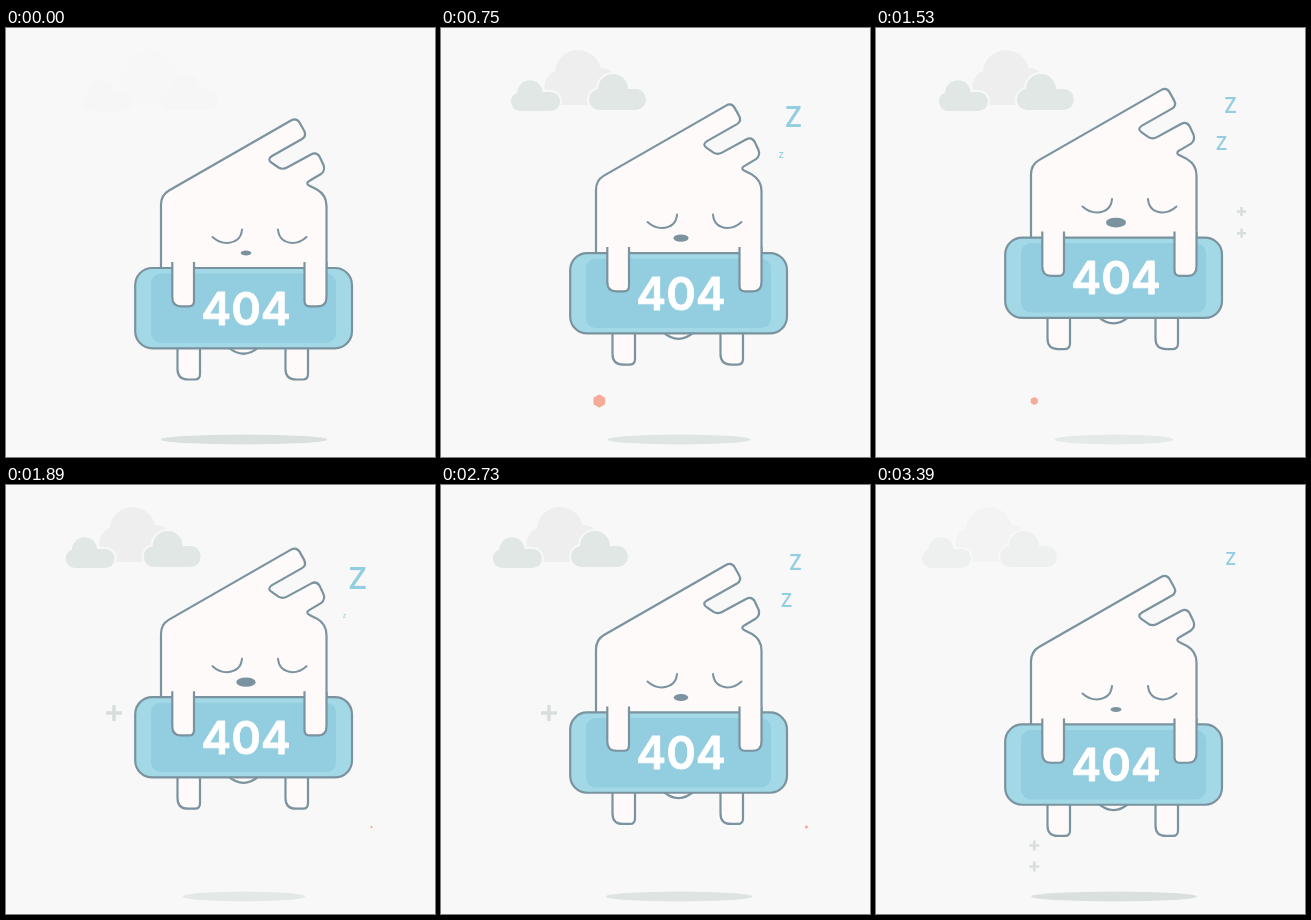
Recreate the animation shown at these times as an HTML page. Size 429 px wide and 429 px high, loop 3420 ms.

```html
<!DOCTYPE html>
<html lang="en">
<head>
<meta charset="utf-8">
<title>404</title>
<style>
  html, body { margin: 0; width: 100%; height: 100%; overflow: hidden; background: #f8f8f8; }
  svg { display: block; width: 100vw; height: 100vh; }
  .line { fill: #fefafa; stroke: #7a939f; stroke-width: 2.2; stroke-linecap: butt; stroke-linejoin: round; }
  .eye { fill: none; stroke-width: 2; stroke-linecap: round; }
  .back { fill: #eeeeee; }
  .gap { fill: #f8f8f8; stroke: #f8f8f8; stroke-width: 4; }
  .front { fill: #e0e7e5; }
  .plus { fill: none; stroke: #d7dedc; }
  .dot { fill: #f5ab98; stroke: #f5ab98; stroke-width: 3; stroke-linejoin: round; }
  .zed { font: 600 35px "Open Sans", sans-serif; fill: #92cde0; text-anchor: middle; }
  .code { font: 600 45px Inter, sans-serif; fill: #fff; stroke: #fff; stroke-width: .8; stroke-linejoin: round; text-anchor: middle; }
</style>
</head>
<body>
<svg viewBox="0 0 429 429">
  <defs>
    <g id="small">
      <rect x="67" y="64" width="49" height="19" rx="9.5"/>
      <circle cx="86" cy="65" r="12.7"/>
    </g>
    <g id="large">
      <rect x="145" y="61" width="57" height="21" rx="10.5"/>
      <circle cx="169" cy="61" r="15"/>
    </g>
  </defs>

  <g id="clouds">
    <g class="back">
      <circle cx="134" cy="45" r="23"/>
      <circle cx="118" cy="59" r="17.5"/>
      <circle cx="157" cy="57" r="17"/>
      <rect x="116" y="50" width="44" height="27"/>
    </g>
    <use href="#small" class="gap"/><use href="#small" class="front"/>
    <use href="#large" class="gap"/><use href="#large" class="front"/>
  </g>

  <ellipse id="shadow" cx="238" cy="411.5" ry="5"/>
  <g id="sparks"></g>
  <g id="zeds"></g>

  <g id="hero">
    <path class="line" d="M171.5 315V341Q171.5 351.5 182 351.5H189Q194 351.5 194 346V315"/>
    <path class="line" d="M279.5 315V341Q279.5 351.5 290 351.5H297Q302 351.5 302 346V315"/>
    <path class="line" d="M222 319Q237.500 332.500 253 319"/>
    <path class="line" d="M155 244V177Q155 167 163 162.500L285 92.500Q290.500 89.500 293.500 94.500L298 102.500Q301 108 296 111L266 128Q260.500 131.500 266 135L272.500 139.500Q276.500 142 281 139.500L305 126.500Q310.500 123.500 313.500 128.500L317.500 137Q319.500 142.500 315 146L304 152.500Q298.500 155.500 304 158L311 161.500Q320.500 167 320.500 178V244"/>
    <path class="line eye" d="M206.500 209Q213 215 221 215Q235 214 236 201.500"/>
    <path class="line eye" d="M300.500 209Q294 215 286.500 215Q273 214 272 201.500"/>
    <ellipse id="nose" cx="240" cy="225" fill="#7a939f"/>
    <rect class="line" x="129.200" y="240" width="216.800" height="80.300" rx="17" style="fill:#a3d9e7"/>
    <rect x="145" y="245.500" width="185" height="69.500" rx="10" fill="#92cde0"/>
    <text class="code" x="240" y="296.500">404</text>
    <path class="line" d="M166.300 234V269Q166.300 278.300 175 278.300H183Q188 278.300 188 273V234"/>
    <path class="line" d="M298.500 234V273Q298.500 278.300 304 278.300H312Q320.500 278.300 320.500 269V234"/>
  </g>
</svg>
<script>
const LOOP = 3420, STEP = 30;
const NS = 'http://www.w3.org/2000/svg';
const byId = id => document.getElementById(id);
const set = (el, attrs) => { for (const k in attrs) el.setAttribute(k, attrs[k]); };
const add = (parent, tag, attrs) => {
  const el = document.createElementNS(NS, tag);
  set(el, attrs);
  return parent.appendChild(el);
};
const clamp = v => Math.max(0, Math.min(1, v));

// Piecewise linear value through [time, value] points
function track(t, pts) {
  if (t <= pts[0][0]) return pts[0][1];
  for (let i = 1; i < pts.length; i++) {
    const [a, u] = pts[i - 1], [b, v] = pts[i];
    if (t <= b) return u + (v - u) * (t - a) / (b - a);
  }
  return pts[pts.length - 1][1];
}

// Snoring letters, one every 600 ms
const Z_GAP = 600, Z_LIFE = 1160;
const zeds = Array.from({ length: 5 }, (_, i) => {
  const el = add(byId('zeds'), 'text', { class: 'zed', y: 12.5 });
  el.textContent = 'Z';
  return { el, born: i * Z_GAP };
});
const Z_X = [[0, 336], [330, 345.5], [480, 349.5], [930, 354.5], [1200, 355.5]];
const Z_SIZE = [[0, 0], [600, 25], [930, 15], [1020, 12], [1080, 6.5], [Z_LIFE, 0]];

// Sparks: a dot swells, then breaks into two plus signs
const S_GAP = 830, S_TIMES = 4;
const hexagon = Array.from({ length: 6 }, (_, i) => {
  const a = (i * 60 - 90) * Math.PI / 180;
  return (5 * Math.cos(a)).toFixed(2) + ',' + (5 * Math.sin(a)).toFixed(2);
}).join(' ');
const sparks = [[108, 228, 40], [365.5, 342, 208], [365.5, 196, 395], [158.3, 373, 625]]
  .map(([x, y, start]) => {
    const g = add(byId('sparks'), 'g', { transform: `translate(${x} ${y})` });
    return {
      start,
      dot: add(g, 'polygon', { class: 'dot', points: hexagon }),
      low: add(g, 'path', { class: 'plus' }),
      high: add(g, 'path', { class: 'plus' })
    };
  });

function drawPlus(el, y, r) {
  set(el, {
    d: r > 0 ? `M${-r} ${y}H${r}M0 ${y - r}V${y + r}` : '',
    'stroke-width': 1.2 + r * 0.28
  });
}

function drawSpark(s, t) {
  const n = Math.floor((t - s.start) / S_GAP);
  const p = n >= 0 && n < S_TIMES ? t - s.start - n * S_GAP : -1;
  const r = p >= 0 && p < 172 ? Math.min(6.5, p * 0.053) : 0;
  set(s.dot, { transform: `scale(${r / 6.5})` });
  const on = p >= 172 && p < 340;
  drawPlus(s.low, track(p, [[215, 0], [275, 8.5], [340, 10]]),
    on ? track(p, [[172, 7], [190, 8], [215, 8], [275, 5], [310, 4.5], [340, 0]]) : 0);
  drawPlus(s.high, -12.5,
    on && p > 205 ? track(p, [[205, 5.5], [225, 6], [275, 5], [310, 4.5], [340, 0]]) : 0);
}

function drawZed(z, t) {
  const age = t - z.born;
  const size = age > 0 && age < Z_LIFE ? track(age, Z_SIZE) : 0;
  const y = 136.4 - age * 0.0633;
  set(z.el, {
    transform: `translate(${track(age, Z_X)} ${y}) scale(${size / 25})`,
    opacity: track(age, [[1020, 1], [1100, 0.5], [Z_LIFE, 0.2]])
  });
}

function render(t) {
  const lift = track(t, [[0, 0], [1635, 32.5], [LOOP, 0]]);
  set(byId('hero'), { transform: `translate(0 ${-lift})` });
  set(byId('nose'), { rx: 5.3 + lift * 0.155, ry: 2.5 + lift * 0.08 });
  set(byId('shadow'), {
    rx: 83.3 - lift * 0.79,
    fill: `rgb(${218 + lift * 0.36},${224 + lift * 0.31},${222 + lift * 0.33})`
  });
  set(byId('clouds'), {
    transform: `translate(${9.8 - t * 0.0091} 0)`,
    opacity: clamp(Math.min(0.08 + t / 540, (3600 - t) / 500))
  });
  zeds.forEach(z => drawZed(z, t));
  sparks.forEach(s => drawSpark(s, t));
}

function tick() {
  const t = performance.now() % LOOP;
  render(Math.floor(t / STEP) * STEP);
  requestAnimationFrame(tick);
}
render(0);
requestAnimationFrame(tick);
</script>
</body>
</html>
```
